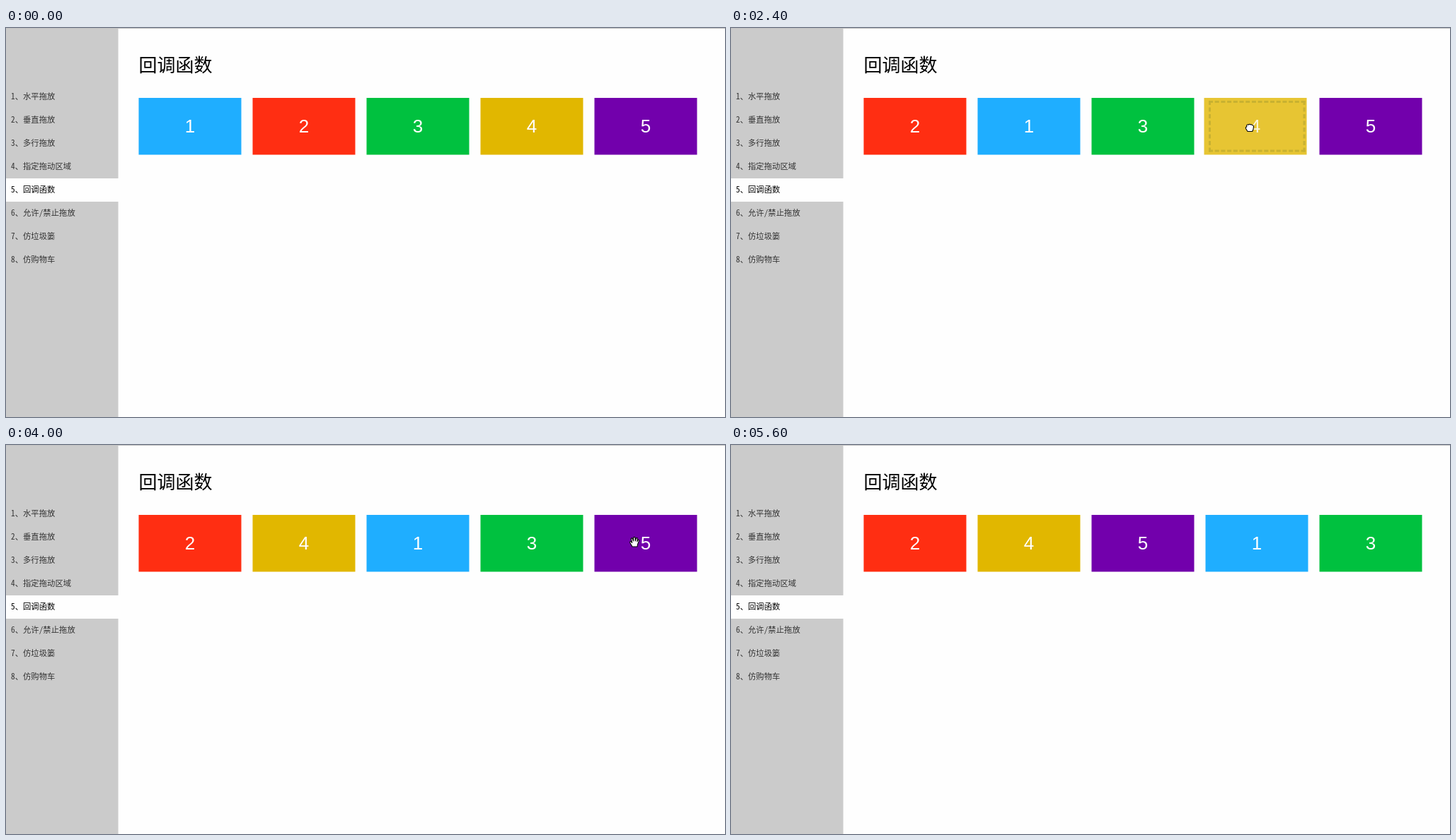
Recreate the animation shown at these times as an HTML page with a canvas. Size 1016 px wide and 551 px high, loop 6000 ms.

```html
<!DOCTYPE html>
<html lang="zh-CN">
<head>
<meta charset="utf-8">
<title>回调函数</title>
<style>
  html, body { margin: 0; width: 100%; height: 100%; overflow: hidden; background: #fefefe; }
  canvas { display: block; }
</style>
</head>
<body>
<canvas id="stage" width="1016" height="551"></canvas>
<script>
const ctx = document.getElementById('stage').getContext('2d');
const LOOP = 6000, STEP = 100, FADE = 200, TRAVEL = 400;
const CJK = '"Noto Sans CJK SC", "Noto Sans CJK", sans-serif';
const MENU_FONT = '11.35px "Noto Sans Mono CJK SC", ' + CJK;
const MENU = ['水平拖放', '垂直拖放', '多行拖放', '指定拖动区域', '回调函数', '允许/禁止拖放', '仿垃圾篓', '仿购物车'];
const ACTIVE = 4;
const COLORS = ['#1faeff', '#ff2e12', '#00c13f', '#e1b700', '#7200ac'];
const CARD = { x: 187.5, y: 99, w: 145, h: 80.5, pitch: 161 };

const at = (x, y) => ({ x, y });
const ENTER = at(869, 78), OK = at(674, 85), EXIT = at(996, 174);
const SHOWN = 200, HIDDEN = 5600;
const DRAGS = [
  { card: 1, start: 620, drop: 1000, close: 1700, grab: at(279, 143), release: at(421, 157), dip: 4 },
  { card: 4, start: 2380, drop: 2800, close: 3500, grab: at(735, 141), release: at(435, 138.5), dip: 0 },
  { card: 5, start: 4000, drop: 4400, close: 5100, grab: at(888, 137), release: at(583, 135.5), dip: 16 }
];

const clamp = k => Math.max(0, Math.min(1, k));
const smooth = k => k * k * (3 - 2 * k);
const easeOut = k => 1 - (1 - k) ** 2;
const lateRise = k => k ** 1.3;

// The pointer reaches a card, drags it, confirms the dialog, then heads for the next one.
function planLegs() {
  const legs = [];
  const leg = (start, end, from, to, easeX = smooth, easeY = smooth, dip = 0) =>
    legs.push({ start, end, from, to, easeX, easeY, dip });
  let from = ENTER, leave = SHOWN;
  for (const d of DRAGS) {
    leg(leave, leave + TRAVEL, from, d.grab);
    leg(d.start, d.drop, d.grab, d.release, smooth, smooth, d.dip);
    leg(d.drop + STEP, d.drop + STEP + 480, d.release, OK, easeOut, lateRise);
    from = OK;
    leave = d.close;
  }
  leg(leave, leave + TRAVEL, OK, EXIT);
  return legs;
}
const LEGS = planLegs();

function pointerAt(t) {
  const { start, end, from, to, easeX, easeY, dip } = LEGS.filter(l => l.start <= t).pop();
  const k = clamp((t - start) / (end - start));
  return at(
    from.x + (to.x - from.x) * easeX(k),
    from.y + (to.y - from.y) * easeY(k) + dip * Math.sin(Math.PI * k)
  );
}

const slotX = i => CARD.x + i * CARD.pitch;
const slotAt = x => Math.max(0, Math.min(4, Math.floor((x - CARD.x) / CARD.pitch)));

function moveCard(order, card, slot) {
  const rest = order.filter(c => c !== card);
  rest.splice(slot, 0, card);
  return rest;
}

function box(g, x, y, w, h, color) {
  g.fillStyle = color;
  g.fillRect(x, y, w, h);
}

function label(g, text, x, y, font, color, align = 'left') {
  g.font = font;
  g.fillStyle = color;
  g.textAlign = align;
  g.fillText(text, x, y);
}

function drawPage() {
  box(ctx, 0, 0, 1016, 551, '#fefefe');
  box(ctx, 0, 0, 158.6, 551, '#cbcbcb');
  box(ctx, 0, 0, 1016, 1, '#c4c4c4');
  box(ctx, 0, 213, 159, 33, '#fefefe');
  MENU.forEach((text, i) =>
    label(ctx, `${i + 1}、${text}`, 7, 101 + i * 33, MENU_FONT, i === ACTIVE ? '#000' : '#333'));
  label(ctx, '回调函数', 187.5, 61.5, '26px ' + CJK, '#000');
}

function drawCard(card, x, y) {
  box(ctx, x, y, CARD.w, CARD.h, COLORS[card - 1]);
  label(ctx, card, x + CARD.w / 2, y + 49, '26px "Liberation Sans", Arial, sans-serif', '#fff', 'center');
}

// A dashed side begins and ends with a full dash, as CSS borders do.
function dashedSide(x0, y0, x1, y1) {
  const length = Math.hypot(x1 - x0, y1 - y0), dash = 6;
  const count = Math.round((length + 3) / 9);
  ctx.setLineDash([dash, (length - dash * count) / (count - 1)]);
  ctx.beginPath();
  ctx.moveTo(x0, y0);
  ctx.lineTo(x1, y1);
  ctx.stroke();
}

function drawPlaceholder(slot) {
  const l = slotX(slot) + 4.5, r = l + 136.5, t = CARD.y + 4, b = t + 72.5;
  ctx.strokeStyle = '#639bf0';
  ctx.lineWidth = 3;
  for (const y of [t + 1.5, b - 1.5]) dashedSide(l, y, r, y);
  for (const x of [l + 1.5, r - 1.5]) dashedSide(x, t, x, b);
  ctx.setLineDash([]);
}

function makeDialog() {
  const layer = document.createElement('canvas');
  layer.width = 1016;
  layer.height = 120;
  const g = layer.getContext('2d');
  g.save();
  g.shadowColor = 'rgba(0,0,0,.4)';
  g.shadowBlur = 4;
  g.shadowOffsetY = 1;
  box(g, 297.5, -20, 424, 126, '#999');
  g.restore();
  box(g, 298.5, -20, 422, 86, '#fff');
  box(g, 298.5, 66, 422, 39, '#ebebeb');
  label(g, 'localhost:63342', 315.5, 27, 'bold 10.7px "Open Sans", "Noto Sans", sans-serif', '#000');
  label(g, '显示 :', 401, 27.5, 'bold 11.4px ' + CJK, '#000');
  label(g, '拖放成功', 315.5, 51.5, '9.7px ' + CJK, '#111');

  const face = g.createLinearGradient(0, 75, 0, 94);
  face.addColorStop(0, '#f0f0f0');
  face.addColorStop(1, '#cecece');
  g.fillStyle = face;
  g.strokeStyle = '#3c7fb1';
  g.beginPath();
  g.roundRect(640.5, 74.5, 67, 20, 2);
  g.fill();
  g.stroke();
  g.strokeStyle = '#6cc5ec';
  g.strokeRect(641.5, 75.5, 65, 18);
  label(g, '确定', OK.x, 88.5, '10px ' + CJK, '#000', 'center');
  return layer;
}
const DIALOG = makeDialog();

// 0 when closed, 1 when fully open.
const dialogAt = t => Math.max(...DRAGS.map(({ drop, close }) =>
  clamp(Math.min(t - drop, close + FADE - t) / FADE)));

function drawDialog(k) {
  ctx.globalAlpha = k ** 1.5;
  ctx.drawImage(DIALOG, 0, -21 * (1 - k));
  ctx.globalAlpha = 1;
}

const SHAPES = {
  arrow: new Path2D('M0 0V14L3.3 11L5.5 15.5L7.6 14.6L5.5 10.2H10Z'),
  open: new Path2D('M-3 7L-6.3 1.2Q-6.6 -.6 -4.8 -.2L-3.3 1.5L-4.8 -4Q-4 -6 -2.7 -4.4L-1.5 -1'
    + 'L-1.5 -5.8Q0 -7.5 1 -5.8L1.2 -1L2.4 -5Q4 -6 4.4 -4.4L3.8 -.2L5 -2.6Q6.6 -3 6.5 -1.4L4.5 4L4 7Z'),
  closed: new Path2D('M-3 5.5L-5.5 1.5Q-6.3 -.8 -4.3 -1V-3.2Q-3 -5 -1.6 -3.8Q-.3 -5.6 1 -4'
    + 'Q2.6 -5 3.5 -3.3Q5.6 -3.4 5.4 -1L5 2.2L3.7 5.5Z')
};

function drawPointer(kind, { x, y }) {
  ctx.save();
  ctx.translate(x, y);
  ctx.lineWidth = 1.1;
  ctx.lineJoin = 'round';
  ctx.fillStyle = '#fff';
  ctx.strokeStyle = '#000';
  ctx.fill(SHAPES[kind]);
  ctx.stroke(SHAPES[kind]);
  ctx.restore();
}

function pointerKind({ x, y }, held, dialog) {
  if (dialog && x > 298 && x < 721 && y < 106) return 'arrow';
  if (held) return 'closed';
  const inRow = y > CARD.y && y < CARD.y + CARD.h;
  const dx = x - slotX(slotAt(x));
  return inRow && dx > 0 && dx < CARD.w ? 'open' : 'arrow';
}

function render(t) {
  let order = [1, 2, 3, 4, 5], held = null;
  for (const { card, start, drop, close, grab } of DRAGS) {
    if (t <= start) break;
    const home = slotX(order.indexOf(card));
    const grip = pointerAt(Math.min(t, drop));
    order = moveCard(order, card, slotAt(grip.x));
    if (t < close) held = { card, x: home + grip.x - grab.x, y: CARD.y + grip.y - grab.y };
  }

  drawPage();
  order.forEach((card, i) => {
    if (held && held.card === card) drawPlaceholder(i);
    else drawCard(card, slotX(i), CARD.y);
  });
  if (held) {
    ctx.globalAlpha = 0.8;
    drawCard(held.card, held.x, held.y);
    ctx.globalAlpha = 1;
  }

  const dialog = dialogAt(t);
  if (dialog) drawDialog(dialog);
  if (t >= SHOWN && t < HIDDEN) {
    const p = pointerAt(t);
    drawPointer(pointerKind(p, held, dialog), p);
  }
}

const began = performance.now();
function tick() {
  const t = (performance.now() - began) % LOOP;
  render(Math.floor(t / STEP) * STEP);
  requestAnimationFrame(tick);
}
tick();
</script>
</body>
</html>
```
